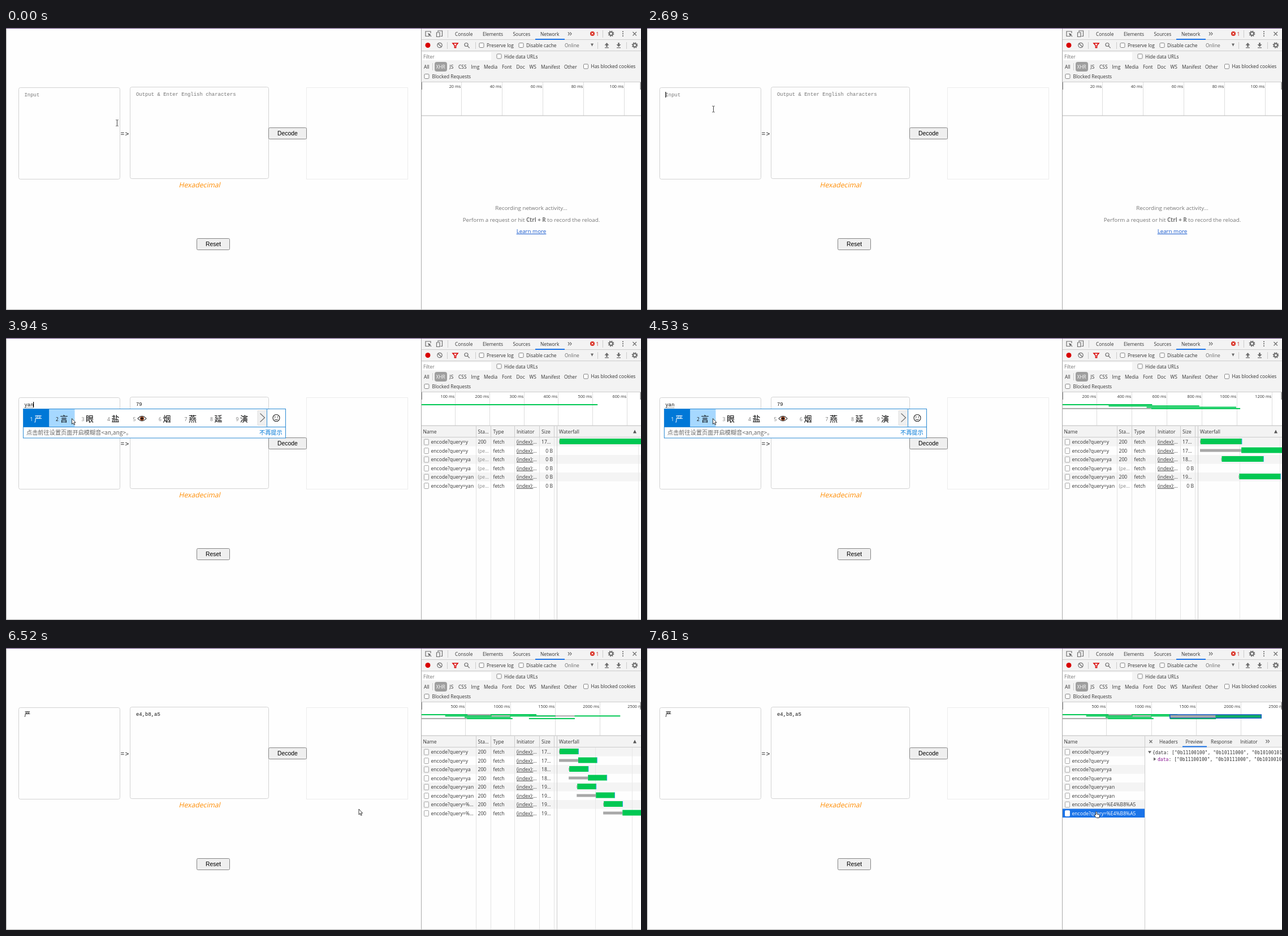
Recreate the animation shown at these times as an HTML page. Size 1123x499 px, loop 8 s.

```html
<!DOCTYPE html>
<html lang="zh-CN">
<head>
<meta charset="utf-8">
<title>Encoder and network panel</title>
<style>
html, body { margin: 0; width: 100%; height: 100%; overflow: hidden; background: #fefefe; }
svg { display: block; width: 1123px; height: 499px; }
text { font: 8.4px "Open Sans", "Noto Sans", sans-serif; fill: #333; white-space: pre; }
.row { font-size: 8.6px; }
.tick { font-size: 7.3px; }
.note { font-size: 9.75px; fill: #757575; text-anchor: middle; }
.mono { font: 8.93px "Liberation Mono", monospace; fill: #111; }
.hint { fill: #757575; }
.arrow { font-size: 11.5px; letter-spacing: 1.1px; }
.btn { font: 10.4px "Liberation Sans", sans-serif; fill: #000; text-anchor: middle; }
.code { font: 8.1px "DejaVu Sans Mono", monospace; }
.cjk { font: 14px "Noto Sans CJK SC", "Noto Sans CJK", sans-serif; fill: #000; }
.small { font-size: 10.2px; fill: #666; }
.num { font-size: 8.6px; fill: #777; }
.end { text-anchor: end; }
.icon { fill: none; stroke: #6e6e6e; stroke-width: 1.2; }
</style>
</head>
<body>
<svg viewBox="0 0 1123 499">
  <g id="base"></g>
  <g id="live"></g>
</svg>
<script>
const LOOP = 8000, BLUE = '#1a73e8', GREEN = '#00c853', GREY = '#a8a8a8';

// Markup helpers
const rect = (x, y, w, h, fill, more = '') =>
  `<rect x="${x}" y="${y}" width="${w}" height="${h}" fill="${fill}" ${more}/>`;
const text = (x, y, s, cls = '', more = '') =>
  `<text x="${x}" y="${y}" class="${cls}" ${more}>${s.replace(/&/g, '&amp;').replace(/</g, '&lt;')}</text>`;
const path = (d, more = 'class="icon"') => `<path d="${d}" ${more}/>`;
const vline = (x, y1, y2, c = '#ccc') => rect(x, y1, 1, y2 - y1, c);
const hline = (x1, x2, y, c = '#ccc') => rect(x1, y, x2 - x1, 1, c);
const box = (x, y, w, h, stroke, r) => rect(x + .5, y + .5, w - 1, h - 1, '#fefefe', `stroke="${stroke}" rx="${r}"`);
const check = (x, y) => rect(x - 4, y - 4, 8, 8, '#fff', 'stroke="#777" stroke-width=".9" rx="1.5"');
const circle = (x, y, r, more) => `<circle cx="${x}" cy="${y}" r="${r}" ${more}/>`;
const button = (x, y, w, label) =>
  rect(x + .5, y + .5, w - 1, 20, '#efefef', 'stroke="#858585" rx="2"') + text(x + w / 2, y + 14, label, 'btn');
const gear = (x, y) => circle(x, y, 3, 'class="icon" style="stroke-width:2"') +
  circle(x, y, 4.6, 'class="icon" style="stroke-width:1.6" stroke-dasharray="1.8 1.81"');

// Last entry of a [time, ...values] track that has begun
const at = (track, t) => track.filter(k => k[0] <= t).pop();

function page() {
  return vline(0, 1, 499, '#aaa') +
    box(22, 105, 180, 163, '#d2d2d2', 3) + box(219, 104, 246, 163, '#d2d2d2', 3) + box(531, 105, 180, 163, '#ececec', 0) +
    text(202.5, 191, '=>', 'mono arrow') +
    button(464, 176, 68, 'Decode') + button(337, 372, 59, 'Reset') +
    text(0, 0, 'Hexadecimal', '', 'transform="translate(305.5 281.5) skewX(-13)" style="font-size:12.2px;fill:#ff8c00"');
}

function toolbars() {
  let s = rect(735, 1, 388, 95, '#f3f3f3') + hline(735, 1123, 20) + hline(735, 1123, 40) + hline(735, 1123, 95);
  const tabs = [[794, 'Console'], [843, 'Elements'], [896.5, 'Sources'], [945, 'Network']];
  for (const [x, label] of tabs) s += text(x, 13.5, label);
  s += rect(936, 19, 52, 2, BLUE);
  // Top icons
  s += path('M749 14.5H742V6H751V9') + path('M746 9l5.5 2.2-2.3.9-.9 2.4z', 'fill="#555"') + path('M748 11l4 4');
  s += path('M764 7V5H771.5V14.5H768.5M761.5 8H767V15.5H761.5z') + vline(781, 4, 17);
  s += path('M994 7.5l2.5 2.8-2.5 2.8M997.5 7.5l2.5 2.8-2.5 2.8');
  s += circle(1037, 10, 4, 'fill="#d93025"') + path('M1035.4 8.4l3.2 3.2m0-3.2l-3.2 3.2', 'stroke="#fff"');
  s += text(1043.5, 13.5, '1', '', 'style="fill:#c5221f"') + vline(1055, 4, 17) + gear(1070, 10);
  for (const y of [6.5, 10.3, 14]) s += circle(1091, y, 1, 'fill="#555"');
  s += path('M1108.5 7l6.5 6.5m0-6.5l-6.5 6.5');
  // Capture controls
  s += circle(746, 30.5, 4.5, 'fill="#d80000"') + circle(767, 30.5, 4.2, 'class="icon"') + path('M764 27.5l6 6');
  s += vline(780, 25, 37) + path('M790 27h9l-3.4 4v3.8h-2.2V31z', 'fill="#fff" stroke="#d80000" stroke-width="1.5"');
  s += circle(814, 29.5, 3, 'class="icon"') + path('M816.2 31.8l3.5 3.5') + vline(830, 25, 37);
  s += check(841, 30.5) + text(850, 33.8, 'Preserve log') + check(911, 30.5) + text(920, 33.8, 'Disable cache');
  s += text(988, 33.8, 'Online', '', 'style="fill:#666"') + path('M1034 27.5h5l-2.5 5z', 'fill="#666"');
  s += vline(1046, 25, 37) + vline(1097, 25, 37) + gear(1112, 30.5);
  s += path('M1062.5 26l4 4.5h-2.7v3h-2.6v-3h-2.7zM1059 34.2h7v1.2h-7z', 'fill="#6e6e6e"');
  s += path('M1083.5 33.5l-4-4.5h2.7v-3h2.6v3h2.7zM1080 34.2h7v1.2h-7z', 'fill="#6e6e6e"');
  // Filters
  s += rect(736, 43, 122, 14, '#fff') + text(738, 53.5, 'Filter', 'hint') + check(872, 50) + text(881, 53.5, 'Hide data URLs');
  s += vline(754, 62, 75) + rect(758, 60, 22, 17, '#9e9e9e', 'rx="4"') + text(760.5, 71.8, 'XHR', '', 'style="fill:#fff"');
  const kinds = [[739, 'All'], [784.5, 'JS'], [800, 'CSS'], [822.5, 'Img'], [845, 'Media'], [877, 'Font'],
    [902.5, 'Doc'], [925.5, 'WS'], [946, 'Manifest'], [987, 'Other']];
  for (const [x, label] of kinds) s += text(x, 71.8, label);
  return s + check(1025.5, 68) + text(1034.5, 71.3, 'Has blocked cookies') +
    check(744, 85.5) + text(753.5, 88.8, 'Blocked Requests');
}

// queued, started, ended (ms), overview lane, listed at, finished at
const requests = [
  ['y', '17…', 0, 0, 512, 0, 3420, 3940],
  ['y', '17…', 0, 506, 1015, 3, 3420, 4530],
  ['ya', '18…', 263, 263, 781, 1, 3690, 4230],
  ['ya', '18…', 263, 770, 1282, 0, 3690, 4670],
  ['yan', '19…', 480, 480, 992, 2, 3940, 4230],
  ['yan', '19…', 480, 985, 1494, 1, 3940, 4950],
  ['%E4%B8%A5', '19…', 1198, 1198, 1710, 3, 4670, 5100],
  ['%E4%B8%A5', '19…', 1198, 1706, 2217, 1, 4670, 5690],
].map(([query, size, queued, start, end, lane, listed, done]) => ({ query, size, queued, start, end, lane, listed, done }));

const spans = [[0, 108, 20], [3690, 378, 100], [3940, 640, 100], [4230, 1232, 200], [4530, 1257, 200],
  [4670, 1760, 500], [5100, 1968, 500], [5690, 2455, 500]];
const output = [[0, ''], [3940, '79'], [4230, '79,61'], [4370, '79,61,6e'], [4530, '79'], [4670, '79,61'],
  [4950, '79,61,6e'], [5100, 'e4,b8,a5']];
const typed = [[0, ''], [3420, 'y'], [3690, 'ya'], [3940, 'yan'], [4670, '严']];
const caret = [[0, 0], [1710, 33], [2280, 0], [2690, 33], [3270, 0], [3420, 38], [3690, 43], [3940, 48.5],
  [4530, 0], [4670, 43], [5100, 0], [5690, 43], [6250, 0], [6790, 43], [7250, 0]];
const pointer = [[0, 196.5, 168, 'beam'], [120, 160, 155, 'beam'], [250, 120, 147, 'beam'], [400, 117.5, 143.5, 'beam'],
  [3420, 116.5, 142.5, 'arrow'], [6250, 270, 200, 'beam'], [6380, 437.5, 253, 'beam'], [6520, 624, 285, 'arrow'],
  [6640, 787, 309, 'arrow'], [6940, 1003, 313, 'arrow'], [7100, 789.5, 288, 'arrow'], [7250, 793.5, 289.5, 'hand']];
const words = { y: '有一要也与用以', ya: '呀压牙亚雅押鸭', yan: '严言眼盐*烟燕延演' };
const OPEN = 7370, LOADED = 7490;

function overview(t) {
  const [, span, step] = at(spans, t), k = 389 / span;
  let s = rect(735, 96, 388, 59, '#fff');
  for (let ms = step; ms < span * 1.05; ms += step) {
    const x = Math.floor(733.7 + ms * k);
    s += vline(x, 96, 155, '#ddd') + text(x - .8, 106, ms + ' ms', 'tick end');
  }
  const done = requests.filter(r => t >= r.done), y = r => 117 + r.lane * 2.3;
  const bar = (r, a, b, c) => rect(735 + a * k, y(r), (b - a) * k, 2, c);
  s += done.map(r => bar(r, r.queued, r.start, GREY)).join('') + done.map(r => bar(r, r.start, r.end, GREEN)).join('');
  if (t >= OPEN) {
    const r = requests[7], x = 735 + r.queued * k, mid = 735 + r.start * k, end = 735 + r.end * k;
    s += rect(x, 118, mid - x, 6, GREY) + rect(mid, 118, end - mid, 6, '#0fae62') +
      rect(x, 118, end - x, 6, 'none', 'stroke="#1a5fc4" stroke-width="1.6"');
    s += rect(x + 1, 124.2, mid - x, 1.6, '#0fae62');
  }
  return s + rect(734, 96, 2, 13, '#888') + rect(1121.5, 96, 2, 13, '#888') + rect(735, 154.5, 388, 1.2, '#c4c4c4');
}

function emptyNote() {
  return text(929, 322, 'Recording network activity…', 'note') +
    `<text x="929" y="342.5" class="note">Perform a request or hit <tspan font-weight="700">Ctrl + R</tspan> to record the reload.</text>` +
    text(929, 363, 'Learn more', 'note', 'style="fill:#15c;text-decoration:underline"');
}

function rows(t) {
  const open = t >= OPEN, right = open ? 880 : 1123;
  const done = requests.filter(r => t >= r.done);
  const last = done.length ? Math.max(...done.map(r => r.end)) : t < 3690 ? 100 : 320;
  const k = 144.6 / last, step = last > 1100 ? 1000 : last > 400 ? 500 : last / 2;
  const listed = requests.filter(r => t >= r.listed);
  let s = rect(735, 156, right - 735, 19, '#f3f3f3') + hline(735, right, 175) + text(737.5, 169, 'Name', 'row');
  listed.forEach((r, i) => { if (i % 2 === 0) s += rect(735, 176 + i * 15.5, right - 735, 15.5, '#f4f4f4'); });
  if (!open) {
    for (let ms = step; ms < last * 1.005; ms += step) s += vline(Math.floor(977 + ms * k), 176, 498, '#e8e8e8');
    for (const x of [831, 857, 899, 943, 969]) s += vline(x, 156, 175) + vline(x, 176, 498, '#e2e2e2');
    s += vline(974, 156, 498);
    for (const [x, h] of [[834.5, 'Sta…'], [861.5, 'Type'], [903, 'Initiator'], [947, 'Size'], [978, 'Waterfall']])
      s += text(x, 169, h, 'row');
    s += path('M1109 168.5h6l-3-6z', 'fill="#555"');
  }
  listed.forEach((r, i) => {
    const y = 176 + i * 15.5, base = y + 11.3, picked = open && i === 7, ready = t >= r.done;
    const query = !open && i > 5 ? '%…' : r.query;
    if (picked) s += rect(735, y, 145, 15.5, BLUE);
    s += rect(739.5, y + 3.2, 8, 9.8, '#fff', `stroke="${picked ? '#fff' : '#999'}" stroke-width=".9" rx="1"`);
    s += text(751.5, base, 'encode?query=' + query, 'row', picked ? 'style="fill:#fff"' : '');
    if (open) return;
    s += ready ? text(834.5, base, '200', 'row') : text(834.5, base, '(pe…', 'row', 'style="fill:#888"');
    s += text(861.5, base, 'fetch', 'row') +
      `<text x="903" y="${base}" class="row"><tspan text-decoration="underline">(index):</tspan>…</text>`;
    s += ready ? text(947, base, r.size, 'row') : text(967, base, '0 B', 'row end');
    if (!ready) return;
    const x = ms => 979 + ms * k;
    s += rect(x(r.queued) - 1, y + 5, (r.start - r.queued) * k + 1, 5, GREY) +
      rect(x(r.start), y + 2, (r.end - r.start) * k, 10, GREEN) + rect(x(r.end) - .5, y + 2, 1, 10, '#29a9e8');
  });
  return s;
}

function preview(t) {
  let s = rect(881, 156, 242, 342, '#fff') + rect(881, 156, 242, 19, '#f3f3f3') + hline(881, 1123, 175) + vline(880, 156, 498);
  s += path('M888.5 163l5 5m0-5l-5 5');
  for (const [x, label] of [[906, 'Headers'], [952.5, 'Preview'], [997, 'Response'], [1049, 'Initiator']]) s += text(x, 168.8, label);
  s += rect(947, 173.5, 43, 2, BLUE) + path('M1094.5 162.5l2.5 2.8-2.5 2.8M1098 162.5l2.5 2.8-2.5 2.8');
  if (t < LOADED) return s;
  const list = '["0b11100100", "0b10111000", "0b10100101"]';
  return s + path('M886 182.2h6l-3 4.5z', 'fill="#666"') + text(894, 187.5, `{data: ${list}}`, 'code') +
    path('M896 193.5v6l4.2-3z', 'fill="#666"') +
    `<text x="903" y="199.5" class="code"><tspan fill="#881391">data</tspan>: ${list}</text>`;
}

function fields(t) {
  const value = at(typed, t)[1], out = at(output, t)[1], x = at(caret, t)[1];
  let s = '';
  if (!value) s += text(32.5, 121.3, 'Input', 'mono hint');
  else if (value === '严') s += text(32.5, 121.2, value, 'cjk', 'style="font-size:10.7px;font-weight:300"');
  else s += text(32.5, 121.3, value, 'mono') +
    path(`M33 123.5h${value.length * 5.36}`, 'stroke="#222" stroke-width=".8" stroke-dasharray="1 1"');
  s += out ? text(230, 120, out, 'mono') : text(230, 120, 'Output & Enter English characters', 'mono hint');
  return s + (x ? rect(x - .5, 113, 1.2, 10, '#000') : '');
}

function eye(x, y) {
  return path(`M${x - 7.5} ${y}q7.5-8.5 15 0q-7.5 8.5-15 0z`, 'fill="#fff" stroke="#222" stroke-width="1.1"') +
    circle(x, y, 3.6, 'fill="#8a3d1c"') + circle(x, y, 1.7, 'fill="#111"');
}

function candidates(t) {
  const list = words[at(typed, t)[1]];
  if (!list) return '';
  const wide = list.length > 7, right = wide ? 494.5 : 380.5, h = wide ? 52 : 32;
  let s = rect(30.5, 125.5, right - 30.5, h - .5, '#fff', 'stroke="#2a8ad4"') +
    rect(31, 126, 45.5, 31, '#0078d7') + rect(76.5, 126, 45, 31, '#a6d8ff');
  [...list].forEach((c, i) => {
    const x = 31 + i * 45.5, tint = i === 0 ? 'style="fill:#fff"' : '';
    s += text(x + 11.5, 146.5, String(i + 1), 'num', i === 1 ? 'style="fill:#111"' : tint);
    s += c === '*' ? eye(x + 27.5, 142.5) : text(x + 19, 147.6, c, 'cjk', tint);
  });
  const edge = right - 33;
  s += rect(edge, 126, 32.5, 31, '#fff') + rect(edge - 16.5, 128.5, 16.5, 26, '#efefef', 'stroke="#d8d8d8" stroke-width=".7"') +
    path(`M${edge - 12} 133.5l8 7.5-8 7.5`) + vline(Math.floor(edge), 126, 157, '#2a8ad4');
  const f = right - 16.5;
  s += circle(f, 141.5, 6, 'fill="none" stroke="#222" stroke-width="1.1"') + circle(f - 2.2, 139.8, .9, 'fill="#222"') +
    circle(f + 2.2, 139.8, .9, 'fill="#222"') + path(`M${f - 3.2} 143q3.2 3.6 6.4 0`, 'fill="none" stroke="#222"');
  if (wide) s += hline(31, right, 157, '#2a8ad4') + text(36, 171, '点击前往设置页面开启模糊音<an,ang>。', 'cjk small') +
    text(448, 171, '不再提示', 'cjk small', 'style="fill:#0078d7"');
  return s;
}

const cursors = {
  beam: path('M-2.3-5.3h1.6q.7 0 .7.7v9.2q0 .7-.7.7h-1.6M2.3-5.3h-1.6q-.7 0-.7.7v9.2q0 .7.7.7h1.6',
    'fill="none" stroke="#444" stroke-width=".9"'),
  arrow: path('M0 0v9.8l2.2-2 1.5 3.5 1.6-.7-1.5-3.4h2.8z', 'fill="#fff" stroke="#222" stroke-width=".9"'),
  hand: path('M0 6V1q0-1 1-1t1 1v3.5l4 .8q1 .3 1 1.3l-.8 4.4h-4.7l-3.5-3.6q-.5-1.2.5-1.4z',
    'fill="#fff" stroke="#222" stroke-width=".9"'),
};

function scene(t) {
  const [, x, y, kind] = at(pointer, t);
  return overview(t) + (t < 3420 ? emptyNote() : rows(t)) + (t >= OPEN ? preview(t) : '') +
    fields(t) + candidates(t) + hline(0, 1123, 498, '#aaa') + vline(734, 1, 499, '#aaa') +
    `<g transform="translate(${x} ${y})">${cursors[kind]}</g>`;
}

const live = document.getElementById('live');
document.getElementById('base').innerHTML = rect(0, 0, 1123, 499, '#fefefe') + page() + toolbars() + hline(0, 1123, 0, '#56366f');

// Redraw only when a step of some track has passed
const marks = [...new Set([spans, output, typed, caret, pointer].flat().map(k => k[0])
  .concat(requests.flatMap(r => [r.listed, r.done]), OPEN, LOADED))].sort((a, b) => a - b);
const begin = performance.now();
let shown = -1;
function tick() {
  const t = (performance.now() - begin) % LOOP;
  const mark = marks.filter(m => m <= t).pop();
  if (mark !== shown) live.innerHTML = scene(shown = mark);
  requestAnimationFrame(tick);
}
tick();
</script>
</body>
</html>
```
